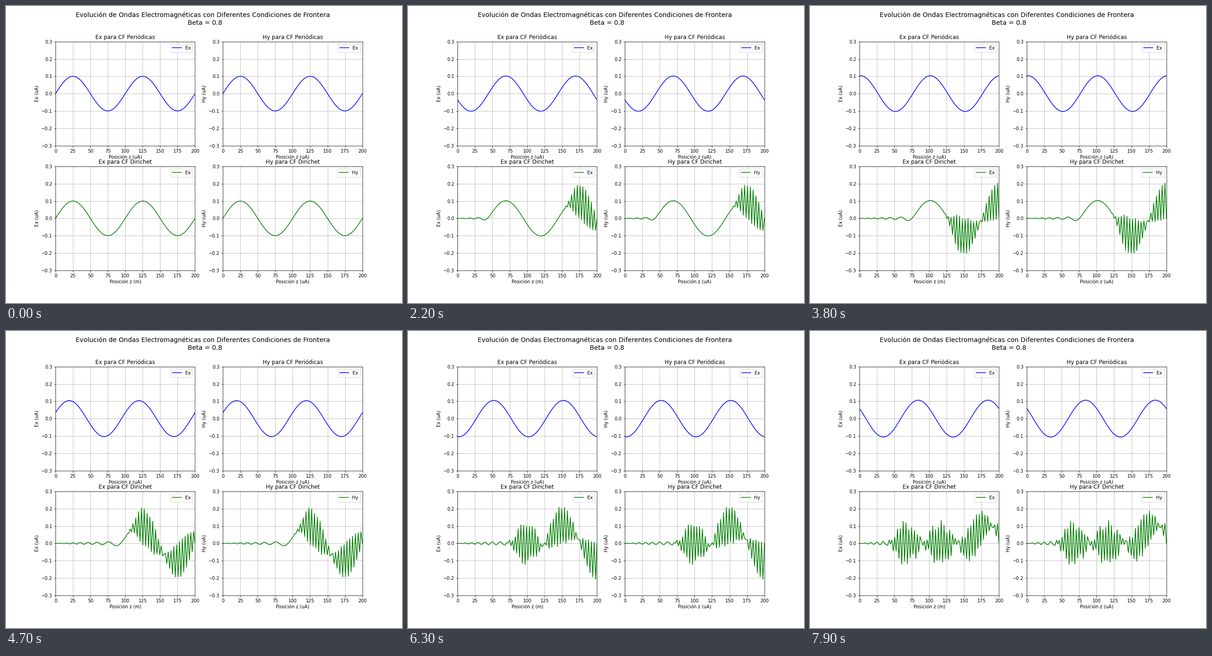
These frames come from a looping animation (864 px wide and 648 px high, 8 s). A matplotlib script:

```python
import numpy as np
import matplotlib.pyplot as plt
from matplotlib.animation import FuncAnimation

N = 100           # grid points
FRAMES = 80
SUBSTEPS = 10     # Euler steps per frame
COURANT = 0.1     # cells travelled per step

z = np.linspace(0, 200, N)


def slope_periodic(f):
    """Central difference; both end points are the same place."""
    d = np.empty_like(f)
    d[1:-1] = f[2:] - f[:-2]
    d[0] = d[-1] = f[1] - f[-2]
    return d / 2


def slope_fixed(f):
    """Central difference that leaves the ends untouched."""
    d = np.zeros_like(f)
    d[1:-1] = (f[2:] - f[:-2]) / 2
    return d


def evolve(slope):
    """States (Ex, Hy) of every frame, from a travelling sine."""
    e = 0.1 * np.sin(2 * np.pi * z / 100)
    e[0] = e[-1] = 0
    h = e.copy()
    states = []
    for _ in range(FRAMES):
        states.append((e, h))
        for _ in range(SUBSTEPS):
            e, h = e - COURANT * slope(h), h - COURANT * slope(e)
    return states


periodic = evolve(slope_periodic)
fixed = evolve(slope_fixed)

plt.rcParams["font.family"] = "DejaVu Sans"
fig, axes = plt.subplots(2, 2, figsize=(12, 9), dpi=72)
fig.suptitle("Evolución de Ondas Electromagnéticas con Diferentes "
             "Condiciones de Frontera \n Beta = 0.8", fontsize=14)


def panel(ax, field, kind, color, label, unit="uA"):
    line, = ax.plot(z, np.zeros(N), color=color, lw=1.5, label=label)
    ax.set(xlim=(0, 200), ylim=(-0.3, 0.3),
           title=f"{field} para CF {kind}",
           xlabel=f"Posición z ({unit})", ylabel=f"{field} (uA)")
    ax.grid(True)
    ax.legend(loc="upper right")
    return line


lines = [
    panel(axes[0, 0], "Ex", "Periódicas", "b", "Ex"),
    panel(axes[0, 1], "Hy", "Periódicas", "b", "Ex"),
    panel(axes[1, 0], "Ex", "Dirichet", "g", "Ex", unit="m"),
    panel(axes[1, 1], "Hy", "Dirichet", "g", "Hy"),
]


def update(i):
    for line, y in zip(lines, periodic[i] + fixed[i]):
        line.set_ydata(y)
    return lines


ani = FuncAnimation(fig, update, frames=FRAMES, interval=100,
                    repeat=True, repeat_delay=0, blit=False)
plt.show()
```
